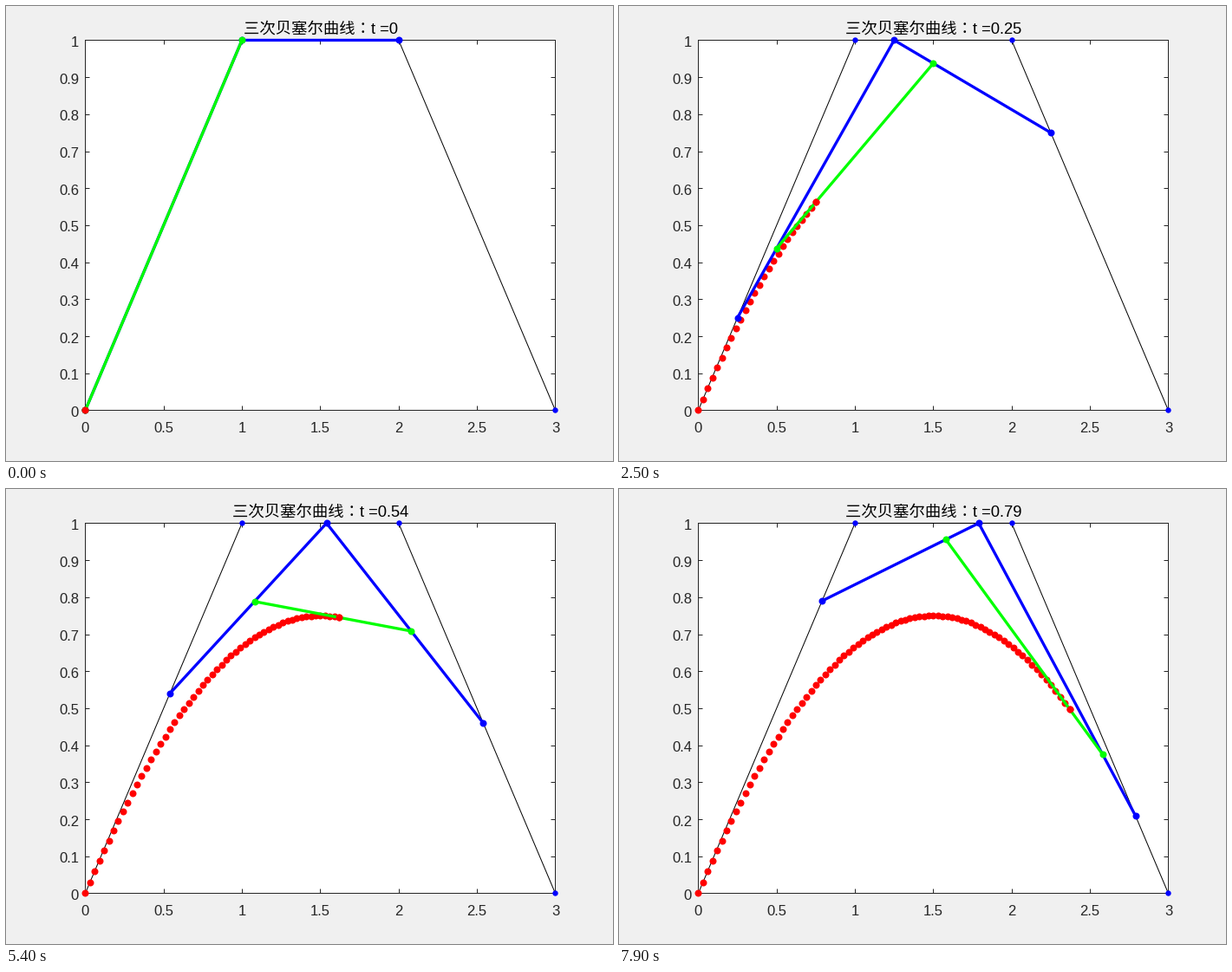
Recreate the animation shown at these times as a matplotlib script. Size 700x525 px, loop 8 s.

```python
import numpy as np
import matplotlib.pyplot as plt
from matplotlib.animation import FuncAnimation

W, H, DPI = 700, 525, 100
FRAMES, INTERVAL = 80, 100
PX = 72 / DPI                      # one pixel in points
INK = "#262626"
FONT = ["Liberation Sans", "Noto Sans CJK JP"]
CTRL = np.array([[0, 0], [1, 1], [2, 1], [3, 0]], float)
# plot box in pixels, measured from the top left corner
LEFT, RIGHT, TOP, BOTTOM = 91.45, 633.45, 39.45, 466.45


def label(x, y, s, size, ha="center", color=INK):
    return fig.text(x / W, 1 - y / H, s, ha=ha, va="baseline",
                    fontsize=size * PX, family=FONT, color=color)


def path(color, width=0, dot=8, z=3):
    return ax.plot([], [], "-o" if width else "o", color=color,
                   lw=width * PX, ms=dot * PX, mew=0,
                   clip_on=False, zorder=z)[0]


def step(pts, t):
    """One round of linear interpolation between neighbours."""
    return (1 - t) * pts[:-1] + t * pts[1:]


def curve(t):
    t = np.atleast_1d(t)[:, None]
    b = [(1 - t) ** 3, 3 * t * (1 - t) ** 2, 3 * t ** 2 * (1 - t), t ** 3]
    return sum(w * p for w, p in zip(b, CTRL))


fig = plt.figure(figsize=(W / DPI, H / DPI), dpi=DPI, facecolor="#f0f0f0")
ax = fig.add_axes([LEFT / W, 1 - BOTTOM / H, (RIGHT - LEFT) / W, (BOTTOM - TOP) / H])
ax.set(xlim=(0, 3), ylim=(0, 1),
       xticks=np.arange(0, 3.1, 0.5), yticks=np.arange(11) / 10)
ax.tick_params(direction="in", length=5.4 * PX, width=PX, color=INK,
               top=True, right=True, labelbottom=False, labelleft=False)
for side in ax.spines.values():
    side.set(color=INK, linewidth=PX)

for v in np.arange(0, 3.1, 0.5):
    label(LEFT + (RIGHT - LEFT) * v / 3, 492, f"{v:g}", 16.67)
for v in np.arange(11) / 10:
    label(84, BOTTOM + (TOP - BOTTOM) * v + 7.5, f"{v:g}", 16.67, "right")
title = label(362.5, 32, "", 18.33, color="black")

ax.plot(*CTRL.T, color="black", lw=PX, clip_on=False, zorder=3)
ax.plot(*CTRL.T, "o", color="blue", ms=6.4 * PX, mew=0, clip_on=False, zorder=3)
trail = path("red", z=4)
first = path("blue", 3.3, z=5)
second = path("lime", 3.3, z=6)
head = path("red", z=7)


def update(i):
    t = i / 100
    title.set_text(f"三次贝塞尔曲线：t ={t:g}")
    a = step(CTRL, t)
    b = step(a, t)
    first.set_data(*a.T)
    second.set_data(*b.T)
    trail.set_data(*curve(np.arange(i + 1) / 100).T)
    head.set_data(*curve(t).T)
    return title, trail, first, second, head


anim = FuncAnimation(fig, update, frames=FRAMES, interval=INTERVAL,
                     repeat=True, repeat_delay=0, blit=False)
plt.show()
```
